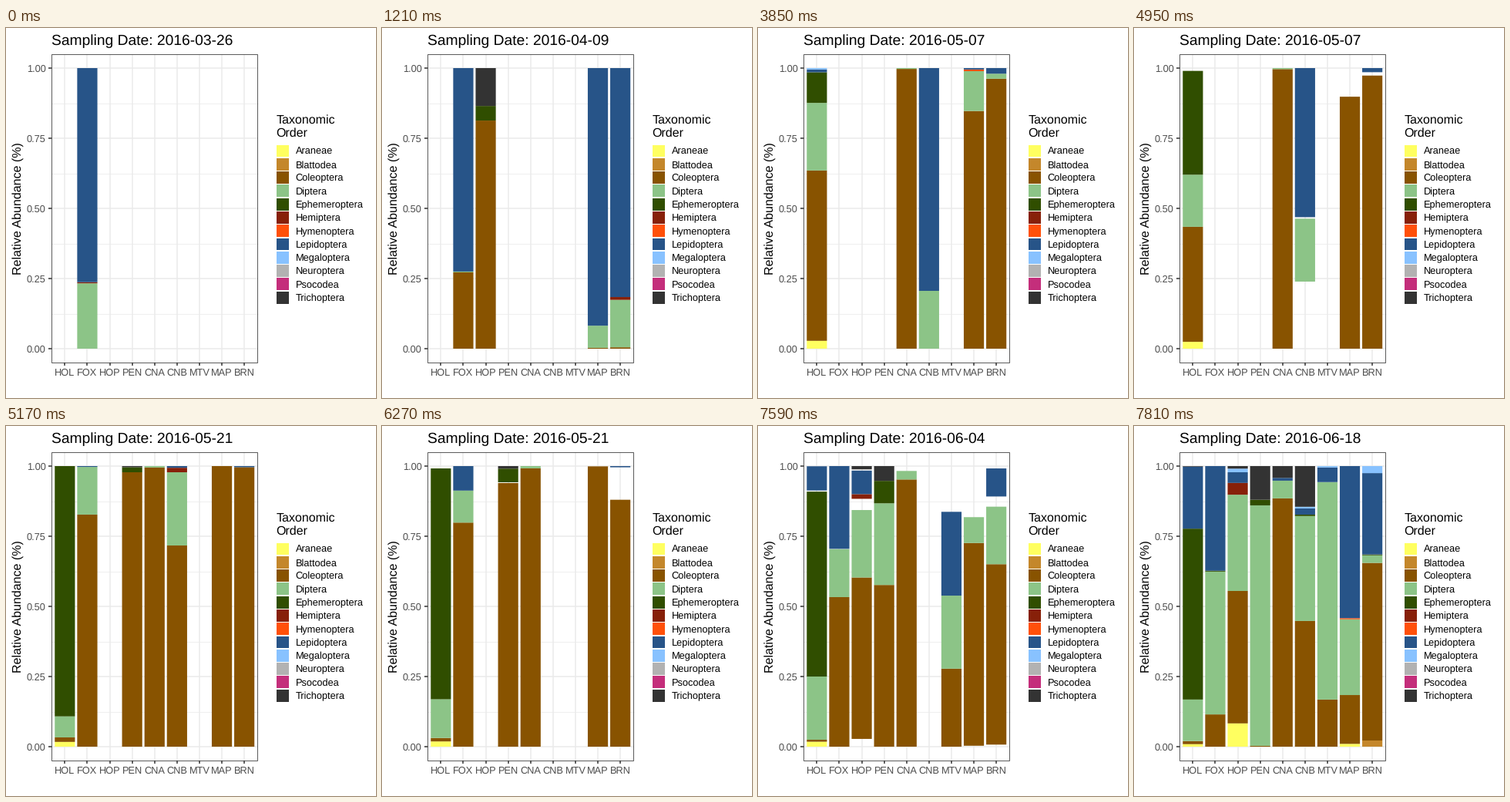
Recreate the animation shown at these times as a matplotlib script. Size 480 px wide and 480 px high, loop 8 s.

```python
import matplotlib.pyplot as plt
from matplotlib.animation import FuncAnimation
from matplotlib.collections import LineCollection, PolyCollection
from matplotlib.patches import Rectangle

plt.rcParams["font.family"] = "Liberation Sans"
plt.rcParams["text.hinting"] = "no_hinting"

SIZE = 480
INTERVAL, LOOP = 20, 8000
PERIOD, HOLD, STEP = 1320, 990, 110

LEFT, TOP, RIGHT, BOTTOM = 58.9, 33.8, 326.6, 434.2
ZERO, SPAN = 416, 364
UNIT = (RIGHT - LEFT) / 9.2
GRID, DARK = "#EBEBEB", "#333333"

SITES = "HOL FOX HOP PEN CNA CNB MTV MAP BRN".split()
ORDERS = {
    "A": ("Araneae", "#FFFF60"),
    "B": ("Blattodea", "#C4872B"),
    "C": ("Coleoptera", "#885300"),
    "D": ("Diptera", "#8CC487"),
    "E": ("Ephemeroptera", "#304E00"),
    "H": ("Hemiptera", "#872009"),
    "Y": ("Hymenoptera", "#FF500A"),
    "L": ("Lepidoptera", "#275488"),
    "M": ("Megaloptera", "#88C2FF"),
    "N": ("Neuroptera", "#B2B2B2"),
    "P": ("Psocodea", "#C42E7B"),
    "T": ("Trichoptera", "#333333"),
}

# Per date and site: stacked orders from the bottom and the cuts between them.
SAMPLES = {
    "2016-03-26": {"FOX": ("DHL", .233, .237)},
    "2016-04-09": {
        "FOX": ("CDL", .272, .275),
        "HOP": ("CET", .813, .865),
        "MAP": ("CDL", .003, .082),
        "BRN": ("CDHL", .005, .174, .184),
    },
    "2016-04-23": {
        "FOX": ("CDL", .863, .984),
        "HOP": ("CDL", .285, .953),
        "MAP": ("CDL", .05, .709),
        "BRN": ("CD", .374),
    },
    "2016-05-07": {
        "HOL": ("ACDELM", .028, .635, .876, .985, .995),
        "CNA": ("CD", .997),
        "CNB": ("DL", .206),
        "MAP": ("CDYL", .847, .989, .995),
        "BRN": ("CDL", .962, .98),
    },
    "2016-05-21": {
        "HOL": ("ACDE", .017, .033, .108),
        "FOX": ("CDL", .827, .997),
        "PEN": ("CET", .978, .996),
        "CNA": ("CD", .995),
        "CNB": ("CDHL", .717, .978, .994),
        "MAP": ("C",),
        "BRN": ("CL", .996),
    },
    "2016-06-04": {
        "HOL": ("ACDEHL", .022, .027, .291, .975, .981),
        "FOX": ("CDL", .742, .744),
        "HOP": ("CDEHLT", .627, .816, .876, .88, .987),
        "PEN": ("CDET", .863, .871, .981),
        "CNA": ("CD", .986),
        "MTV": ("CDLT", .333, .336, .758),
        "MAP": ("CD", .997),
        "BRN": ("CDYL", .648, .942, .995),
    },
    "2016-06-18": {
        "HOL": ("ACDELT", .009, .02, .168, .777, .998),
        "FOX": ("CDEL", .115, .624, .627),
        "HOP": ("ACDHLMT", .083, .555, .898, .94, .978, .991),
        "PEN": ("CDET", .003, .86, .88),
        "CNA": ("CDLT", .885, .948, .958),
        "CNB": ("CDELMT", .448, .822, .827, .849, .855),
        "MTV": ("CDLM", .168, .943, .995),
        "MAP": ("ACDYL", .01, .184, .454, .458),
        "BRN": ("BCDELM", .022, .655, .682, .685, .975),
    },
}


def site_x(i):
    return LEFT + (i + 0.6) * UNIT


def value_y(v):
    return ZERO - SPAN * v


def stack(sample):
    """Map (site, order) to the (low, high) extent of its bar piece."""
    pieces = {}
    for site, (codes, *cuts) in sample.items():
        for code, low, high in zip(codes, [0, *cuts], [*cuts, 1]):
            pieces[site, code] = low, high
    return pieces


DATES = list(SAMPLES)
STACKS = [stack(s) for s in SAMPLES.values()]


def blend(a, b, t):
    """Pieces found on both dates move linearly; the others switch hard."""
    if t == 0:
        return a
    if t == 1:
        return b
    return {k: tuple(p + (q - p) * t for p, q in zip(a[k], b[k]))
            for k in a if k in b}


def box(x0, y0, x1, y1):
    return [(x0, y0), (x1, y0), (x1, y1), (x0, y1)]


def piece_box(site, low, high):
    x = site_x(SITES.index(site))
    return box(x - 0.45 * UNIT, value_y(low), x + 0.45 * UNIT, value_y(high))


fig = plt.figure(figsize=(SIZE / 72, SIZE / 72), dpi=72, facecolor="white")
ax = fig.add_axes([0, 0, 1, 1])
ax.set(xlim=(0, SIZE), ylim=(SIZE, 0))
ax.axis("off")


def lines(segments, color, width, z):
    ax.add_collection(LineCollection(segments, colors=color, linewidths=width,
                                     capstyle="butt", zorder=z), autolim=False)


def text(x, y, s, size, color="black", **kw):
    return ax.text(x, y, s, fontsize=size, color=color, va="baseline", **kw)


# Grid, border and ticks
quarters = [i / 4 for i in range(5)]
centers = [site_x(i) for i in range(len(SITES))]
lines([[(LEFT, value_y(v + .125)), (RIGHT, value_y(v + .125))]
       for v in quarters[:4]], GRID, 0.78, 1)
lines([[(LEFT, value_y(v)), (RIGHT, value_y(v))] for v in quarters]
      + [[(x, TOP), (x, BOTTOM)] for x in centers], GRID, 1.55, 1)
lines([[(LEFT - 4, value_y(v)), (LEFT, value_y(v))] for v in quarters]
      + [[(x, BOTTOM), (x, BOTTOM + 4)] for x in centers], DARK, 1.55, 1)
ax.add_patch(Rectangle((LEFT + .4, TOP + .4), RIGHT - LEFT - .8,
                       BOTTOM - TOP - .8, fill=False, ec=DARK, lw=0.8,
                       zorder=4))

# Axis labels
for v in quarters:
    text(51.6, value_y(v) + 4.6, f"{v:.2f}", 12.8, "#4D4D4D", ha="right")
for x, site in zip(centers, SITES):
    text(x, 451, site, 12.8, "#4D4D4D", ha="center")
text(19.6, 234.5, "Relative Abundance (%)", 16, ha="center", rotation=90,
     rotation_mode="anchor")
title = text(LEFT, 22, "", 19.2)

# Legend
KEY_X, KEY_Y, KEY = 350.5, 150.9, 17.28
text(KEY_X, 124, "Taxonomic", 16)
text(KEY_X, 141.2, "Order", 16)
for i, (name, color) in enumerate(ORDERS.values()):
    y = KEY_Y + i * KEY
    ax.add_patch(Rectangle((KEY_X + .7, y + .7), KEY - 1.4, KEY - 1.4,
                           fc=color, lw=0))
    text(KEY_X + KEY + 8, y + KEY / 2 + 4.6, name, 12.8)

bars = PolyCollection([], linewidths=0, snap=False, zorder=3)
ax.add_collection(bars, autolim=False)


def update(frame):
    k, rest = divmod(frame * INTERVAL + INTERVAL // 2, PERIOD)
    step = max(0, (rest - HOLD) // STEP + 1)
    nxt = min(k + 1, len(DATES) - 1)
    pieces = blend(STACKS[k], STACKS[nxt], step / 3)
    bars.set_verts([piece_box(site, *ext) for (site, _), ext in pieces.items()])
    bars.set_facecolor([ORDERS[code][1] for _, code in pieces])
    title.set_text("Sampling Date: " + DATES[nxt if step > 1 else k])
    return bars, title


anim = FuncAnimation(fig, update, frames=LOOP // INTERVAL, interval=INTERVAL,
                     repeat=True, repeat_delay=0)
plt.show()
```
